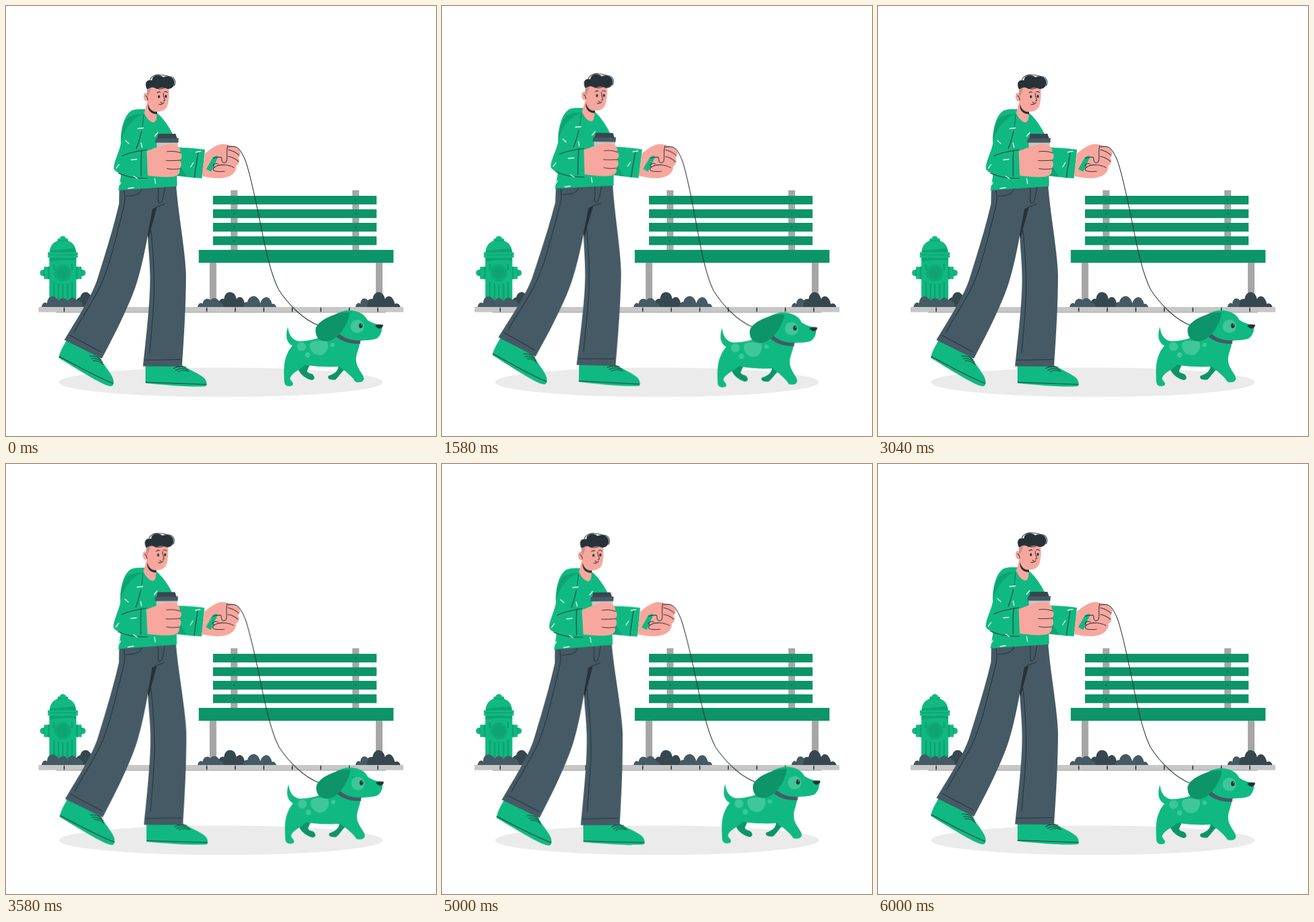
Recreate the animation shown at these times as an HTML page. Size 700 by 700 pixels, loop 6.04 s.

```html
<!DOCTYPE html>
<html lang="en">
<head>
<meta charset="utf-8">
<title>Walking the dog</title>
<style>
html, body { margin: 0; width: 100%; height: 100%; overflow: hidden; background: #fff; }
svg { display: block; width: 100vw; height: 100vh; }
.green { fill: #10b981; }
.shade { fill: #0fa372; }
.deep { fill: #0d9468; }
.mint { fill: #3fc799; }
.slate { fill: #455a64; }
.dusk { fill: #37474f; }
.ink { fill: #263238; }
.skin { fill: #f8a79e; }
.gray { fill: #a6a6a6; }
.pale { fill: #c7c7c7; }
.line { fill: none; stroke: #263238; stroke-width: 1.1; stroke-linecap: round; stroke-linejoin: round; }
.dash { fill: none; stroke: #fff; stroke-width: 1.3; stroke-linecap: round; }
.sway { transform-origin: 350px 350px; animation: sway 6.04s linear infinite; }
@keyframes sway {
  0%, 50%, 100% { transform: rotate(0deg); }
  25% { transform: rotate(1deg); }
  75% { transform: rotate(-1deg); }
}
</style>
</head>
<body>
<svg viewBox="0 0 700 700">
  <ellipse cx="350" cy="612.5" rx="263.5" ry="24" fill="#ebebeb"/>

  <!-- kerb -->
  <rect class="pale" x="53" y="490" width="594" height="8.4"/>
  <rect class="gray" x="82" y="498" width="536" height="1.2"/>
  <path id="joints" class="ink"/>

  <!-- bench -->
  <path class="gray" d="M365.800 300h11v97h-11zM563.800 300h11v97h-11zM331.500 418h11v72h-11zM602 418h11v72h-11z"/>
  <path class="deep" d="M337 309h266.300v14H337zM337 331h266.300v14.200H337zM337 353h266.300v14.200H337zM337 375h266.300v14.200H337zM313.800 397h317v21h-317z"/>
  <g id="screws" class="ink" opacity=".65"></g>

  <!-- hydrant -->
  <g class="green">
    <ellipse cx="92.500" cy="378.500" rx="5" ry="4"/>
    <rect x="84" y="378.500" width="17" height="6" rx="1.500"/>
    <path d="M71 402C71 388 80 381 92.500 381S114 388 114 402Z"/>
    <rect x="68" y="401" width="49" height="3.500"/>
    <rect x="70" y="404" width="45" height="5"/>
    <rect x="68" y="406.500" width="49" height="3"/>
    <rect x="70.500" y="409" width="44" height="81"/>
    <path d="M62 424.500h9v20h-9zM114 424.500h9v20h-9z"/>
    <ellipse cx="59.500" cy="434.500" rx="4.200" ry="5"/>
    <ellipse cx="125.500" cy="434.500" rx="4.200" ry="5"/>
  </g>
  <g class="shade">
    <path d="M84 381.500h17v1.400H84zM71.500 398Q92 396 112 394.500Q114 398 114 401H71zM68 404.500h49v1.600H68zM71 410h43v4.500Q92 412 71 416z"/>
    <path d="M60.500 429h1.800v11h-1.800zM68 424.500h3v20h-3zM114 424.500h3v20h-3zM122.500 429h1.800v11h-1.800z"/>
    <path d="M76.500 450q1.500-3 3 0v30h-3zM84 453q1.500-3 3 0v28h-3zM91 454q1.500-3 3 0v28h-3zM98.500 453q1.500-3 3 0v28h-3zM106 450q1.500-3 3 0v30h-3z"/>
    <path d="M76.500 420h3v10h-3zM106 420h3v10h-3z"/>
    <circle cx="92.500" cy="434.500" r="14" opacity=".65"/>
    <circle cx="92.500" cy="434.500" r="10"/>
  </g>

  <!-- bushes -->
  <path class="dusk" d="M110 490C113 478 117 475 121 474C122 467 130 463 135 468C139 472 141 475 142 480C147 482 149 486 149 490Z"/>
  <path class="slate" d="M58 490C59 484 63 481 67 484C67 474 75 470 81 475C83 476 85 478 86 480C90 474 97 474 100 481C104 473 111 473 115 479C120 478 125 483 126 490Z"/>
  <path class="dusk" d="M345 490C345 480 350 475 355 477C356 468 361 465 366 466C372 467 374 471 375 477C380 471 386 474 388 482L391 490Z"/>
  <path class="slate" d="M312 490C313 484 317 482 320 485C321 477 328 474 333 479C337 473 345 475 348 483C351 483 354 486 355 490Z"/>
  <path class="slate" d="M386 490C387 484 390 481 393 482C395 473 403 470 408 474C411 476 413 480 414 484C417 473 426 471 430 478C432 480 432 482 433 485C437 484 439 487 440 490Z"/>
  <path class="slate" d="M569 490C570 484 574 482 577 485C577 476 584 473 589 479C592 476 597 477 599 481L604 490Z"/>
  <path class="dusk" d="M588 490C588 481 592 476 597 477C598 469 603 465 608 466C614 468 616 472 617 477C622 469 630 472 633 485C638 483 641 486 642 490Z"/>

  <g class="sway">
    <!-- shoes -->
    <path class="green" d="M99 543L152 571C158 583 170 596 174 606C176 612 176 618 171 619C160 618 142 607 86 573C87 564 92 556 99 543Z"/>
    <path class="green" d="M227 584H285C297 591 315 599 322 605C327 610 328 617 325 619C302 621 260 617 227 614Z"/>
    <path class="line" d="M86.500 570.500C112 584 150 605 174 614M227.500 612.500L326 616"/>
    <path class="line" stroke-width="1.500" d="M136 570C144 569 150 571 155 576M138.500 574C146 573 153 576 157 580M142 577.500C149 577 155 580 158 584M273 590C280 586 286 587 293 588M276 593C283 589 289 589 296 592M280 595.500C286 592 291 592 298 595"/>

    <!-- trousers -->
    <path class="slate" d="M184.500 296L277 292C280 335 292 400 293 437C293 490 289 550 286.500 587L223 586.500C228 540 235 480 234.500 440C234 410 231 390 231 373C222 420 215 448 206 470C191 507 174 540 156 574L95 543.500C115 510 138 475 148 447C160 408 174 365 184 322Z"/>
    <path class="ink" d="M238 331L245.500 328C242 342 237 358 232 379L230.500 372C233 358 236 346 238 331Z"/>
    <path class="line" d="M192 300C196 318 191 327 188 342C177 385 167 428 153 457C140 484 121 511 111 531M221 297C220 306 212 309 195 309.500M247.500 296C250 308 245 318 250 321C256 320 256 308 259 295M258 322.500C251 325 244 327 239 331M236 365C239 395 242 430 241 470C240 500 236 535 234 565M104 536L155 563.500M226 576.500L284 575.500"/>

    <!-- far arm -->
    <path class="green" d="M262 228C275 231 302 230 324 234L319 280.500C306 280 292 278 272 276Z"/>
    <!-- sweater -->
    <path class="green" d="M205 170C211 167.500 220 168 228 168L247 175C257 184 265 196 271 208C281 228 284 246 278 262L278.500 293.500L183 300L187 277L186.500 273C179 270 175 267 175.500 262C177 250 184 238 187 224C186 202 192 177 205 170Z"/>
    <path class="shade" d="M224 176C206 183 193 199 187 221C187 202 193 188 199 181C207 177 216 175 224 176Z"/>
    <path class="shade" d="M281 252C285 262 289 270 295 278L277 275Z"/>

    <!-- neck and head -->
    <path class="skin" d="M231 152L225 174C229 184 236 190 241 189.500C246 187 245 180 246 168L250 160Z"/>
    <path class="ink" d="M231 159C233 168 239 173 246 172L246 176C236 176 230 170 231 159Z"/>
    <path class="skin" d="M231 130L265 129C266 146 265 157 262 164C258 172 247 174 240 170C234 167 231 160 230 155C226 156 224 152 224 147C224 142 227 140 230 143Z"/>
    <path fill="#cb908a" d="M230 135L236 132C236 139 233 143 231 148L229 143Z"/>
    <path class="ink" d="M229.500 135.500C225 126 228 119 238 121C237 113 250 110 256 116C264 112 274 116 274 124C275 133 266 137 260 134C254 131 250 135 244 134.500C238 130 233 134 229.500 135.500Z"/>
    <path class="line" stroke-width=".8" d="M234 122C235 115 243 111 251 112C258 112 264 115 268 115C275 116 277 124 274 130M243 133C248 136 254 135 258 133M227 146C230 147 230 150 231 153"/>
    <ellipse class="ink" cx="249" cy="147.500" rx="1.700" ry="2.600"/>
    <ellipse class="ink" cx="260.300" cy="147" rx="1.700" ry="2.600"/>
    <path class="line" stroke-width="1.700" d="M246 141.500Q249 138.500 251 140.500M257.500 140Q261 138 263 141"/>
    <path class="line" d="M256 142C256 148 259 152 258.500 154L256 154.500M249 160C252 161 256 159.500 257 157M251.500 156.500L254 158"/>

    <!-- cup -->
    <path class="pale" d="M245 221L280 221L279 240H247Z"/>
    <path class="slate" d="M244 215H281L280.500 222.500H243Z"/>
    <path class="dusk" d="M248 208H276L278.500 215.500H246Z"/>

    <!-- near sleeve and hand -->
    <path class="skin" d="M229 236C241 232 251 227 262 225C274 223 285 228 283.500 238C288 242 286 249 283 251C287 256 286 262 282 265C285 271 280 276 274 277.500C258 280 244 277 229 276Z"/>
    <path class="green" d="M186 245L229 234L231 280.500C215 281 199 278 185 273Z"/>
    <path class="line" d="M262 237C270 236 278 237 284 239M261 251.500C269 252 276 252 284 251M262 264.500C268 266 276 266 282 265"/>
    <path class="line" d="M221 234C219 249 220 264 220 277M189 244C202 238 214 236 229 234M183 272C198 279 214 281 230 280.500M220.500 204C218 215 215 225 212 232M313 237C311 252 308 267 307 279"/>
    <path class="line" stroke-width=".5" opacity=".6" d="M224 177L222 197"/>
    <path class="dash" d="M214.500 199.500L223.500 198.500M242 212L247 206M194.500 219L200 224M220 223L221.500 230M179.500 264L184 258M204 250.500L213 249.500M208 277L214 281M242 281L243.500 289M199 297L208 295.500M185 291L187 287M309 238L317 236.500M300.500 262L305 255"/>

    <!-- far hand -->
    <path class="skin" d="M324 240C337 229 349 222 360 226C369 227 380 232 381.500 238C382 242 381 245 378 247C382 252 379 258 375 260C376 266 372 270 370 273C358 283 337 281 319 277Z"/>
    <path class="green" d="M337 246L347 242L334 270L326 265.500Z"/>
    <path class="skin" d="M343 245C347 240 352 237 351 230L361 228C360 240 364 256 354 256C349 254 351 250 349 246Z"/>
    <path class="skin" d="M340 259C347 254 365 257 372 263L368 270C355 272 337 271 337 265Z"/>
    <path class="line" stroke-width="1.300" d="M361 227C357 240 364 254 355 255.500C349 254 353 248 350 246C346 246 341 246 338 248M362 234C370 236 376 239 379 243M362 245C368 246 374 249 378 253M346 257C337 255 335 261 340 262C350 256 364 259 371 263M340 262C333 267 339 271 356 269"/>

    <!-- dog -->
    <path class="deep" d="M477 584C471 594 486 606 497 609C504 609 503 602 498 599C494 598 491 597 490 594L495 583ZM541 585C542 594 533 600 525 602C522 607 528 609 536 608.500C542 603 546 596 552 591Z"/>
    <path class="green" d="M459 522C460 536 468 547 481 545.500C495 545 510 541 518 536L540 528L576 548C575 558 569 568 570 577C570 589 582 599 582.500 606C583 612 576 613.500 569 612C563 602 551 594 543 587C521 588 501 587 487 584C478 593 463 598 462.500 607C464 611 470 614 466 618C457 621 453 617 453 610C452 593 452 578 458 566C460 560 464 556 466 553C455 547 455 534 459 522Z"/>
    <g class="mint">
      <circle cx="481" cy="554.500" r="7.200"/>
      <path d="M495 550C498 542 510 546 522 544C527 553 523 567 511 568.500C501 569 493 559 495 550Z"/>
      <circle cx="491" cy="568" r="4.200"/>
      <circle cx="531.500" cy="551.500" r="3.500"/>
    </g>
    <path class="line" stroke-width="1.400" d="M362 229.500C375 226 382 231 391 255C412 322 421 418 444 462C459 485 484 511 509 520"/>
    <path class="green" d="M536 502C546 496 554 495 562 495.500C575 497 584 502 588 511C595 516 604 518 612 519.500C613 526 611 536 604 541C593 545 583 544 577 545C560 546 544 540 538 532Z"/>
    <path class="slate" d="M541 532C550 541 562 545 577 544.500L576.500 550C560 551 544 545 537 537Z"/>
    <path class="deep" d="M559 498.500C541 497 506 511 504 526C503 539 510 546 523 546C538 543 548 529 553 519C558 509 560 503 559 498.500Z"/>
    <circle class="mint" cx="572" cy="521.500" r="10.800"/>
    <ellipse class="ink" cx="577.500" cy="520.500" rx="3" ry="4"/>
    <circle cx="578.600" cy="518.800" r=".7" fill="#fff"/>
    <path class="ink" d="M601 520.500C604 518 613 518 614 519.500C614 523 609 526 606.500 525C604 524 602 522 601 520.500Z"/>
  </g>
</svg>
<script>
const range = (n, f) => Array.from({ length: n }, (_, i) => f(i)).join("");
joints.setAttribute("d", range(12, i =>
  `M${94.2 + i * 46.42} 490.500h1l.5 4-.5 3.500h-1l-.5-3.500z`));
screws.innerHTML = range(8, i =>
  `<circle cx="${i % 2 ? 569.3 : 371.3}" cy="${316 + 22 * (i >> 1)}" r="1.1"/>`);
</script>
</body>
</html>
```
